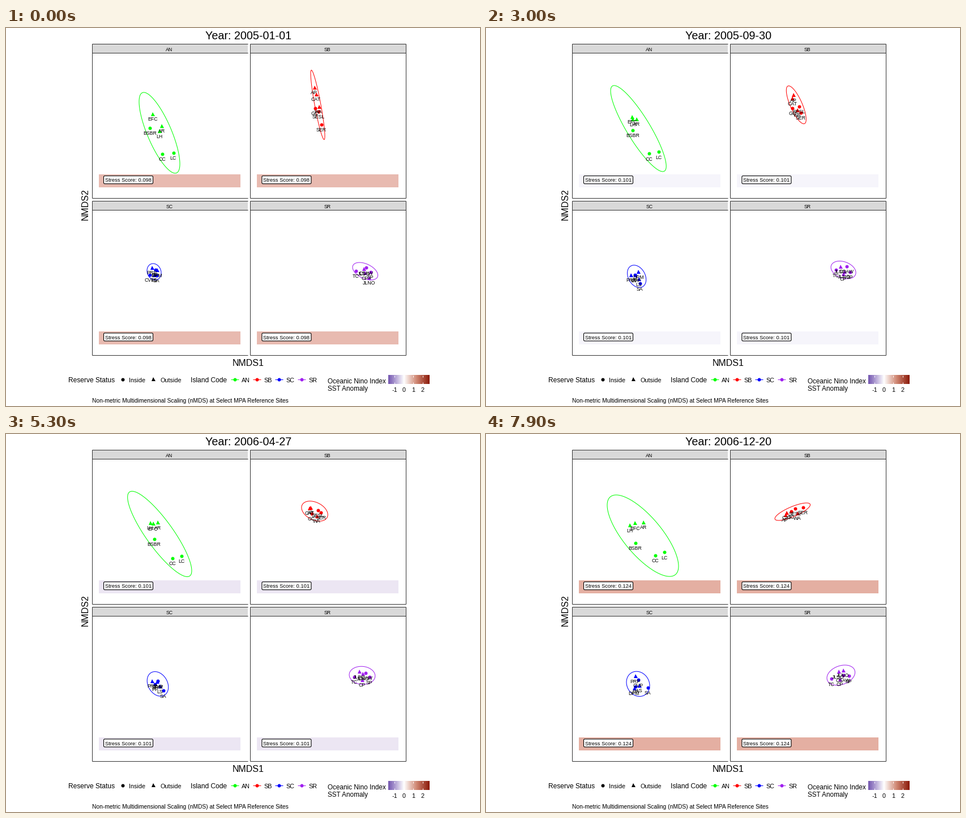
Animation of 837x669 px, one loop 8 s. Source, as a matplotlib script:

```python
import numpy as np
import matplotlib.pyplot as plt
from matplotlib.animation import FuncAnimation
from matplotlib.colors import LinearSegmentedColormap, to_rgb
from matplotlib.patches import FancyBboxPatch, Rectangle

W, H, DPI = 837, 669, 72  # at 72 dpi one point is one pixel
FRAMES, STEP_MS = 80, 100
DAYS_PER_FRAME = 9.09
YEARS = (0, 40.15, 79)  # frames at which the yearly surveys fall
COL, ROW = 279.4, 278.2  # facet spacing
GREY = "#333333"

plt.rcParams["font.family"] = "Liberation Sans"
fig = plt.figure(figsize=((W + .01) / DPI, (H + .01) / DPI), dpi=DPI, facecolor="white")
ax = fig.add_axes([0, 0, 1, 1])
ax.axis("off")


def text(x, y, s, size, ha="left", **kw):
    return ax.text(x, y, s, size=size, ha=ha, va="baseline", color="black", **kw)


def line(xs, ys, color=GREY, lw=1, z=2):
    return ax.plot(xs, ys, color=color, lw=lw, zorder=z, solid_capstyle="butt")[0]


def dot(x, y, color, outside, z=4):
    return ax.plot([x], [y], marker="^" if outside else "o", ms=7 if outside else 6,
                   mew=0, color=color, zorder=z)[0]


def tween(n, keys):
    """Linear blend between the yearly rows of keys."""
    return [np.interp(n, YEARS, k) for k in np.transpose(keys)]


THETA = np.linspace(0, 2 * np.pi, 120)
bands, scores, ellipses, points = [], [], [], []


def facet(name, col, row):
    dx, dy = col * COL, row * ROW
    left, right = 152 + dx, 427 + dx
    top, mid, bottom = 28 + dy, 44 + dy, 301 + dy
    ax.add_patch(Rectangle((left, top), right - left, mid - top, fc="#D9D9D9", lw=0, zorder=1))
    for y in (top, mid, bottom):
        line([left, right], [y, y])
    line([left, left], [top, bottom])
    if col:
        line([right, right], [top, bottom])
    text(288.5 + dx, 41 + dy, name, 8.8, "center")

    band = Rectangle((164 + dx, 259 + dy), 250, 23, lw=0, zorder=1)
    bands.append(ax.add_patch(band))
    ax.add_patch(FancyBboxPatch((172.5 + dx, 261.7 + dy), 87, 14,
                                boxstyle="round,pad=0,rounding_size=2",
                                fc="white", ec="black", lw=1.1, zorder=5))
    scores.append(text(175 + dx, 272.3 + dy, "", 9.3, zorder=6))


def island(name, color, col, row, ellipse, inside, outside):
    """ellipse rows: centre x, centre y, half width, shear, depth.
    Each site has a code and one (x, y) per survey."""
    facet(name, col, row)
    ellipses.append((line([], [], color, 1, 3), ellipse))
    for sites, is_out in ((inside, False), (outside, True)):
        for code, keys in sites.items():
            label = text(0, 0, code, 8.8, "center", zorder=7)
            points.append((dot(0, 0, color, is_out), label, keys))


island("AN", "#00FF00", 0, 0,
       [(271, 185.5, 36, 55, 45.7), (268.5, 175.4, 53.5, 70.5, 34), (277, 180, 63, 54, 47.8)],
       {"BSBR": [(254, 177), (260.8, 182), (263.5, 193)],
        "CC": [(276, 223), (291.8, 222), (298.7, 215)],
        "LC": [(295.5, 221), (308, 218.5), (315.3, 209.5)]},
       {"EFC": [(259, 152), (258, 158.8), (263, 157.5)],
        "AR": [(275, 173), (263, 156.4), (278.3, 155.8)],
        "LH": [(271, 182.5), (255, 154.3), (254, 161.5)]})

island("SB", "#FF0000", 1, 0,
       [(550.5, 136, 12.5, 55.2, 27), (546.9, 136, 19.2, 15.5, 20), (541.3, 137.5, 31.2, -12.2, 9.5)],
       {"GC": [(545.5, 142), (540, 142), (538.5, 137.5)],
        "SESL": [(552, 148), (553, 136), (546, 132)],
        "SER": [(557, 171), (555, 142.8), (559.5, 130)]},
       {"AP": [(544.5, 105), (543, 123), (528.5, 143)],
        "CAT": [(547.5, 117), (539, 126.5), (531, 139)],
        "WA": [(552.5, 139), (549, 147), (550, 140)]})

island("SC", "#0000FF", 0, 1,
       [(261.5, 431.5, 12.5, 2, 14.4), (267.7, 442.3, 17.9, 7, 20.5), (268.5, 442.3, 20.5, 3, 21.9)],
       {"CVP": [(254, 437), (268, 438), (269.3, 435.5)],
        "SA": [(266, 438), (273.5, 457), (286, 448.8)],
        "PP": [(263.5, 428), (262.7, 440.5), (264, 447)]},
       {"PRP": [(257.5, 424), (256, 441), (263.5, 428.3)],
        "DPM": [(266.8, 428.3), (270.3, 432.4), (261.5, 450)],
        "LS": [(261.5, 437), (272.5, 447), (271, 445)]})

island("SR", "#A020F0", 1, 1,
       [(634.3, 430.5, 22.3, 7, 13.8), (630, 427.4, 21.9, 4, 15.3), (626.8, 426.8, 24.8, -5, 17.1)],
       {"TC": [(617.5, 430), (618, 427.8), (610, 433.5)],
        "CSAW": [(636, 424.5), (636.8, 421), (631, 427)],
        "SP": [(644, 432), (642.5, 431.5), (640.5, 428.3)]},
       {"JLSO": [(632, 426), (624.3, 420.4), (622.5, 420.5)],
        "JLNO": [(641, 442), (630, 427), (630.5, 418)],
        "CP": [(634, 433.5), (630.5, 435.2), (624.7, 434)]})

# Titles
title = text(428.5, 20, "", 19.8, "center")
text(428, 598, "NMDS1", 16, "center")
text(145, 312, "NMDS2", 16, "center", rotation=90, rotation_mode="anchor")
text(151.5, 663.3, "Non-metric Multidimensional Scaling (nMDS) at Select MPA Reference Sites", 10.3)

# Shape and colour legends
text(110.3, 627, "Reserve Status", 12)
dot(206, 622, "black", False)
text(217.3, 626.5, "Inside", 10.7)
dot(260, 621.5, "black", True)
text(272, 626.5, "Outside", 10.7)
text(326, 627, "Island Code", 12)
for x, tx, name, color in ((404, 416, "AN", "#00FF00"), (443, 455, "SB", "#FF0000"),
                           (482, 494.5, "SC", "#0000FF"), (522, 534.5, "SR", "#A020F0")):
    line([x - 7, x + 7], [622, 622], color)
    dot(x, 622, color, False)
    text(tx, 626.5, name, 10.7)

# Colour bar
text(567.5, 629, "Oceanic Nino Index", 11.8)
text(567.5, 641.5, "SST Anomaly", 11.8)
cmap = LinearSegmentedColormap.from_list(
    "anomaly", [(0, "#7254B0"), (.38, "white"), (.69, "#CF8672"), (1, "#8B1A0A")])
ax.imshow(np.linspace(0, 1, 256)[None], cmap=cmap, aspect="auto",
          extent=(675, 747.5, 630, 615), zorder=1)
for x, s in ((686, "-1"), (703, "0"), (719.3, "1"), (735.5, "2")):
    line([x, x], [615, 618], "white")
    line([x, x], [627, 630], "white")
    text(x, 644.3, s, 10.7, "center")

ax.set_xlim(0, W)
ax.set_ylim(H, 0)

BAND_AT = (0, 18, 30, 35, 45, 57, 61, 79)
BAND_RGB = np.array([to_rgb(c) for c in (
    "#E8BAB0", "#F8F0F2", "#F6F5FB", "#BEADDA", "#CFC3E4", "#FBF8FB", "#FCF4F2", "#E4AFA2")])


def draw(n):
    title.set_text(f"Year: {np.datetime64('2005-01-01') + int(n * DAYS_PER_FRAME)}")
    survey = int(np.argmin([abs(n - y) for y in (0, 40.15, 80.3)]))
    for score in scores:
        score.set_text("Stress Score: " + ("0.098", "0.101", "0.124")[survey])
    rgb = [np.interp(n, BAND_AT, ch) for ch in BAND_RGB.T]
    for band in bands:
        band.set_facecolor(rgb)
    for curve, keys in ellipses:
        cx, cy, a, b, c = tween(n, keys)
        curve.set_data(cx + a * np.cos(THETA), cy + b * np.cos(THETA) + c * np.sin(THETA))
    for mark, label, keys in points:
        x, y = tween(n, keys)
        mark.set_data([x], [y])
        label.set_position((x - .3, y + 12.4))
    return []


anim = FuncAnimation(fig, draw, frames=FRAMES, interval=STEP_MS, repeat=True, blit=False)
plt.show()
```
